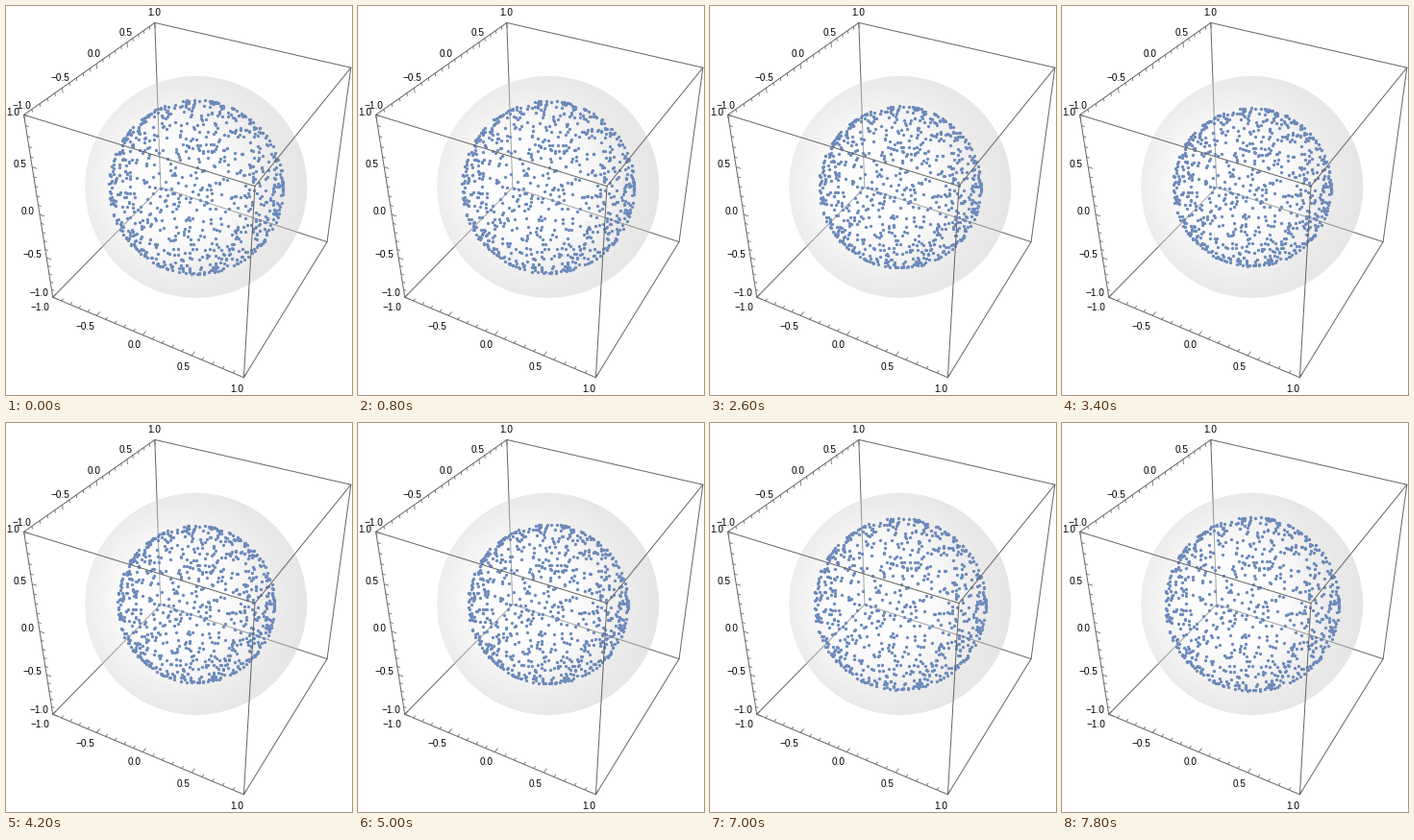
Write a matplotlib script that moves like this. It is 360 by 405 pixels and loops after 8000 ms.

```python
import itertools

import matplotlib.pyplot as plt
import numpy as np
from matplotlib.animation import FuncAnimation

W, H, DPI = 360, 405, 72
FRAMES, STEP = 40, 200
EDGE = "#666666"
DOT = "#6b8abb"
COUNT = 850

# Perspective camera looking at the middle of the box
EYE = np.array([2.6, -4.8, 4.0])
DIST = np.linalg.norm(EYE)
AHEAD = -EYE / DIST
RIGHT = np.cross(AHEAD, [0, 0, 1])
RIGHT /= np.linalg.norm(RIGHT)
UP = np.cross(RIGHT, AHEAD)
FOCAL = 773
CENTRE = np.array([197.7, 188.4])


def project(p):
    p = np.asarray(p, float)
    scale = FOCAL / (DIST + p @ AHEAD)
    return np.stack([CENTRE[0] + scale * (p @ RIGHT),
                     CENTRE[1] - scale * (p @ UP)], axis=-1)


fig = plt.figure(figsize=(W / DPI, H / DPI), dpi=DPI, facecolor="white")
ax = fig.add_axes([0, 0, 1, 1])
ax.set_xlim(0, W)
ax.set_ylim(H, 0)
ax.axis("off")


def line(a, b, z, width=1.0):
    ax.plot(*np.array([a, b]).T, color=EDGE, lw=width, zorder=z,
            solid_capstyle="round")


def draw_box():
    hidden = (-1, 1, -1)
    for a, b in itertools.combinations(itertools.product((-1, 1), repeat=3), 2):
        if sum(i != j for i, j in zip(a, b)) == 1:
            line(project(a), project(b), 1 if hidden in (a, b) else 4)


def draw_sphere():
    radius = FOCAL / np.sqrt(DIST ** 2 - 1)
    y, x = np.mgrid[0:H, 0:W] + 0.5
    rim = np.hypot(x - CENTRE[0], y - CENTRE[1])
    glow = np.hypot(x - 178, y - 186) / radius
    t = np.clip((glow - 0.3) / 0.85, 0, 1)
    shade = 253 - 22 * t * t * (3 - 2 * t)
    alpha = 0.42
    img = np.ones((H, W, 4))
    img[..., :3] = (1 - (255 - shade) / 255 / alpha)[..., None]
    img[..., 3] = alpha * np.clip(radius - rim + 0.5, 0, 1)
    ax.imshow(img, extent=(0, W, H, 0), interpolation="nearest",
              aspect="auto", zorder=2)


def draw_axis(start, axis, inward, labels):
    start, inward = np.array(start, float), np.array(inward, float)
    for k in range(-10, 11):
        p = start.copy()
        p[axis] = k / 10
        a = project(p)
        d = project(p + 0.05 * inward) - a
        size = 5 if k % 5 == 0 else 3
        line(a, a + d / np.linalg.norm(d) * size, 4, 0.8)
    for v, (x, y) in zip(np.linspace(-1, 1, 5), labels):
        ax.text(x, y, f"{v:.1f}".replace("-", "\u2212"), fontsize=10,
                family="Liberation Sans", color="black", ha="center",
                va="center_baseline", zorder=5)


draw_box()
draw_sphere()
draw_axis((0, -1, -1), 0, (0, 1, 0),
          [(35, 313), (82, 333), (133.5, 352.5), (185, 375), (240.5, 398)])
draw_axis((-1, 0, 1), 1, (0, 0, -1),
          [(16, 103), (56, 74), (92, 49), (125, 27), (154, 6.5)])
draw_axis((-1, -1, 0), 2, (1, 0, 0),
          [(34, 298.5), (27.5, 257.5), (23, 213), (15, 164), (7, 110)])

# Evenly distributed random directions
rng = np.random.default_rng(7)
height = rng.uniform(-1, 1, COUNT)
turn = rng.uniform(0, 2 * np.pi, COUNT)
ring = np.sqrt(1 - height ** 2)
cloud = np.column_stack([ring * np.cos(turn), ring * np.sin(turn), height])

dots = ax.scatter([], [], s=3.3 ** 2, color=DOT, linewidths=0, zorder=3)


def update(i):
    radius = 0.75 + 0.038 * np.cos(2 * np.pi * i / FRAMES)
    dots.set_offsets(project(radius * cloud))
    return (dots,)


anim = FuncAnimation(fig, update, frames=FRAMES, interval=STEP,
                     repeat=True, repeat_delay=0, blit=False)
plt.show()
```
